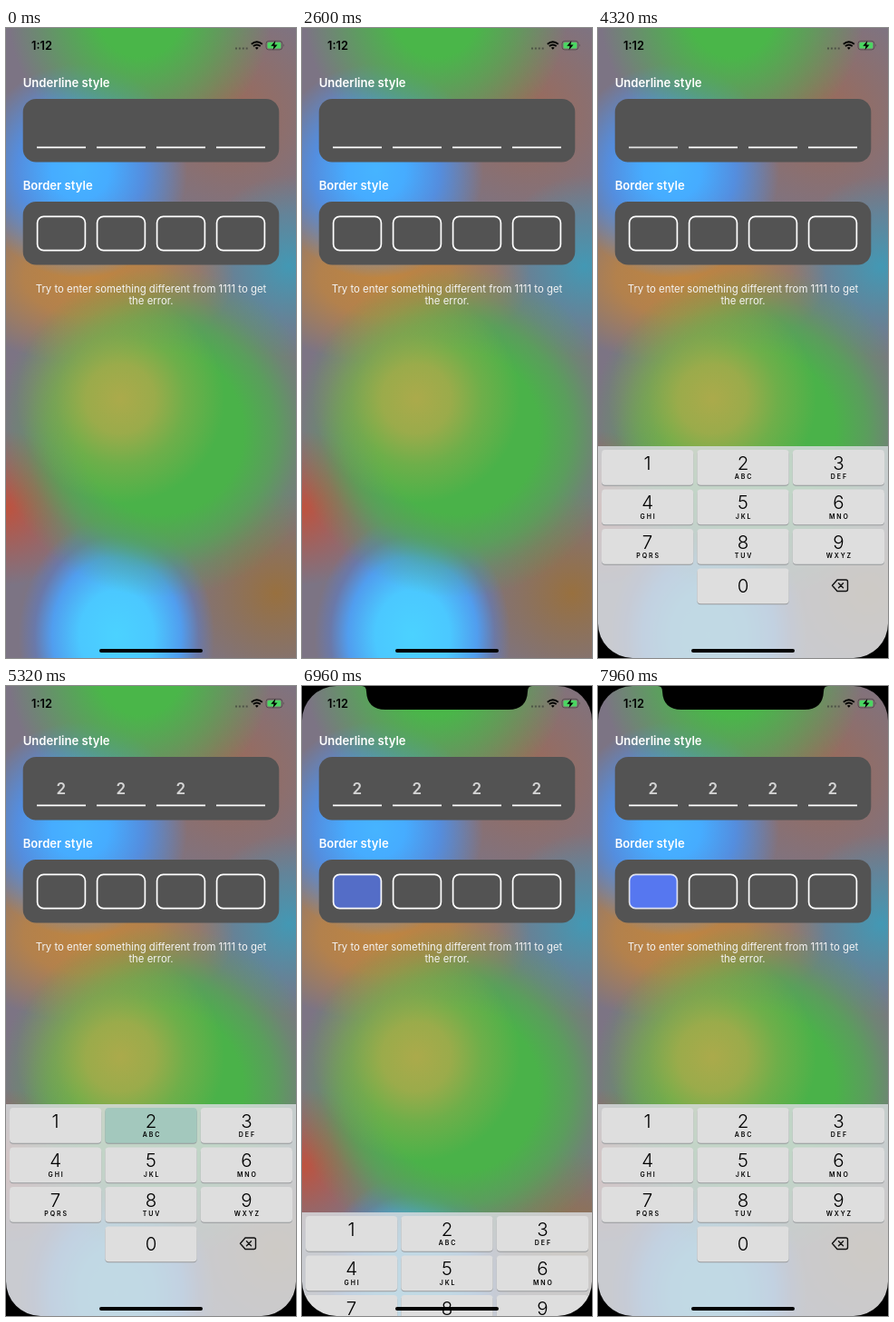
Recreate the animation shown at these times as an HTML page. Size 320 by 693 pixels, loop 8 s.

```html
<!DOCTYPE html>
<html lang="en">
<head>
<meta charset="utf-8">
<title>Passcode fields</title>
<style>
html, body { margin: 0; width: 100%; height: 100%; overflow: hidden; }
body {
  background:
    radial-gradient(circle at 126px 408px, #abaa4b 0, #a9aa4bd8 38px, #a5aa4b66 72px, #a5aa4b00 115px),
    radial-gradient(circle at 172px 445px, #4ab249 0, #4ab249 90px, #4ab249aa 125px, #4ab24944 152px, #4ab24900 182px),
    radial-gradient(ellipse 108px 130px at 122px 668px, #4bd2ff 0, #4bc8ff 38%, #4aa4ffdd 66%, #5080e066 84%, #5078d000 100%),
    radial-gradient(circle at 148px -14px, #4ab649 0, #4ab649 46px, #4ab64999 88px, #4ab64900 145px),
    radial-gradient(circle at 82px 157px, #46b4ff 0, #46acff 32px, #4a94f5cc 70px, #4a88e800 118px),
    radial-gradient(ellipse 160px 95px at 92px 274px, #bf8540 0, #bb8344dd 45%, #b8704400 100%),
    radial-gradient(circle at 312px 262px, #4398b4 0, #4a98b400 100px),
    radial-gradient(circle at 250px 95px, #9c6a58 0, #9a6a5a00 125px),
    radial-gradient(circle at 0 528px, #be523e 0, #b8553f00 85px),
    radial-gradient(circle at 298px 622px, #98703f 0, #96704500 110px),
    #7c7484;
}
svg { display: block; width: 100vw; height: 100vh; font-family: Inter, "Liberation Sans", sans-serif; }
.title { font-size: 13.1px; font-weight: 600; fill: #fff; }
.note { font-size: 11.4px; fill: #f4f4f4; text-anchor: middle; }
.code { font-size: 17px; font-weight: 600; fill: #d4d4d4; text-anchor: middle; }
.digit { font-size: 20.5px; font-weight: 300; text-anchor: middle; }
.abc { font-size: 7px; font-weight: 600; letter-spacing: 1.9px; text-anchor: middle; }
</style>
</head>
<body>
<svg viewBox="0 0 320 693" preserveAspectRatio="none">
  <text class="title" x="18.7" y="65">Underline style</text>
  <text class="title" x="18.7" y="178.3">Border style</text>
  <g fill="#535353">
    <rect x="18.7" y="78" width="282.6" height="69.5" rx="14.5"/>
    <rect x="18.7" y="191" width="282.6" height="69.5" rx="14.5"/>
  </g>
  <g id="cells" stroke="#fff" stroke-width="1.7" fill="none"></g>
  <text class="note" x="160" y="290.7">Try to enter something different from 1111 to get</text>
  <text class="note" x="160" y="303.9">the error.</text>

  <g id="keyboard">
    <rect y="460" width="320" height="236" fill="#d8dcdf" fill-opacity=".84"/>
    <g id="keys"></g>
    <path d="M264 607h9.500q2 0 2 2v8.500q0 2-2 2H264l-5.500-6.250zM265.500 610.800l5 5m0-5l-5 5"
      fill="none" stroke="#111" stroke-width="1.4" stroke-linejoin="round" stroke-linecap="round"/>
  </g>

  <path id="lowCorners" d="M0 655A38 38 0 0 0 38 693H0zM320 655A38 38 0 0 1 282 693H320z"/>
  <path id="bezel" d="M0 38A38 38 0 0 1 38 0H0zM320 38A38 38 0 0 0 282 0H320zM66 0Q71 0 71 6Q72 26 92 26H228Q248 26 249 6Q249 0 254 0z"/>

  <text x="28" y="23.800" font-size="12.800" font-weight="600">1:12</text>
  <path d="M253 22.500h14" stroke="#333" stroke-width="2" stroke-dasharray="2 1.900" opacity=".6"/>
  <g fill="none" stroke="#000" stroke-width="1.900">
    <path d="M270.800 17.700q6-5 12 0M272.900 20.100q3.900-3.200 7.800 0"/>
    <path d="M274.900 21.700q1.900-1.500 3.800 0l-1.900 2z" fill="#000" stroke="none"/>
  </g>
  <rect x="287" y="14.300" width="17.800" height="9.600" rx="2.800" fill="none" stroke="#333" stroke-opacity=".55"/>
  <rect x="288.500" y="15.800" width="14.800" height="6.600" rx="1.500" fill="#4bd662"/>
  <path d="M306 17.500q1.600 1.600 0 3.200z" fill="#333" opacity=".6"/>
  <path d="M297.300 14l-5 5.700h3.200l-1 4.500 5-5.700h-3.200z"/>
  <rect x="103" y="683" width="114" height="4" rx="2"/>
</svg>
<script>
const LOOP = 8000, HEIGHT = 236;
const FOCUS = 2660, REFOCUS = 6850, DISMISS = 5540, BEZEL = 6040;
const PRESSES = [4600, 4930, 5220, 5500];
const $ = id => document.getElementById(id);

function add(parent, tag, attrs, text = "") {
  const el = document.createElementNS("http://www.w3.org/2000/svg", tag);
  for (const name in attrs) el.setAttribute(name, attrs[name]);
  el.textContent = text;
  parent.append(el);
  return el;
}

const lines = [], boxes = [], codes = [];
for (let i = 0; i < 4; i++) {
  const x = 34 + 66 * i;
  lines.push(add($("cells"), "path", { d: `M${x} 131.4h54` }));
  boxes.push(add($("cells"), "rect", { x: x + .6, y: 207.3, width: 52.8, height: 37.4, rx: 7 }));
  codes.push(add($("cells"), "text", { class: "code", x: x + 26.7, y: 119.2, stroke: "none" }, "2"));
}

const letters = ["", "ABC", "DEF", "GHI", "JKL", "MNO", "PQRS", "TUV", "WXYZ"];
function addKey(label, col, row, abc) {
  const x = 4 + 105.4 * col, y = 464 + 43.5 * row;
  const box = { x, width: 101.2, height: 38.7, rx: 4 };
  add($("keys"), "rect", { ...box, y: y + 1, fill: "#96999c" });
  const key = add($("keys"), "rect", { ...box, y, fill: "#dedede" });
  const mid = x + 50.6;
  add($("keys"), "text", { class: "digit", x: mid, y: y + (label ? 21.8 : 26.3) }, label);
  add($("keys"), "text", { class: "abc", x: mid + 1, y: y + 32.2 }, abc);
  return key;
}
const keys = letters.map((abc, i) => addKey(i + 1, i % 3, Math.floor(i / 3), abc));
addKey(0, 1, 3, "");

const clamp = v => Math.max(0, Math.min(1, v));
// Critically damped spring from 0 to 1
const spring = ms => {
  const a = Math.max(0, ms) * .015;
  return 1 - (1 + a) * Math.exp(-a);
};
const pulse = ms => 1 - .275 * (1 - Math.cos(2 * Math.PI * ms / 1400));
const mix = (a, b, p) => `rgb(${a.map((v, i) => Math.round(v + (b[i] - v) * p))})`;

function draw(t) {
  const shown = t < DISMISS ? spring(t - FOCUS)
    : t < REFOCUS ? 1 - spring(t - DISMISS) : spring(t - REFOCUS);
  $("keyboard").setAttribute("transform", `translate(0 ${(1 - shown) * HEIGHT})`);

  const starts = [FOCUS, ...PRESSES];
  lines.forEach((line, i) => {
    const active = t >= starts[i] && t < starts[i + 1];
    line.setAttribute("opacity", active ? pulse(t - starts[i]) : 1);
    codes[i].setAttribute("opacity", t >= PRESSES[i] ? 1 : 0);
  });

  const since = t - REFOCUS;
  boxes[0].setAttribute("stroke-opacity", since > 0 ? pulse(since) : 1);
  boxes[0].setAttribute("fill", `rgba(86,119,240,${clamp(since / 150)})`);

  const last = PRESSES.filter(p => p <= t).pop() ?? -LOOP;
  const pressed = 1 - clamp((t - last - 110) / 140);
  keys[1].setAttribute("fill", mix([222, 222, 222], [163, 200, 189], pressed));

  $("lowCorners").setAttribute("opacity", t >= FOCUS ? 1 : 0);
  $("bezel").setAttribute("opacity", t >= BEZEL ? 1 : 0);
}

const began = performance.now();
function frame() {
  draw((performance.now() - began) % LOOP);
  requestAnimationFrame(frame);
}
frame();
</script>
</body>
</html>
```
